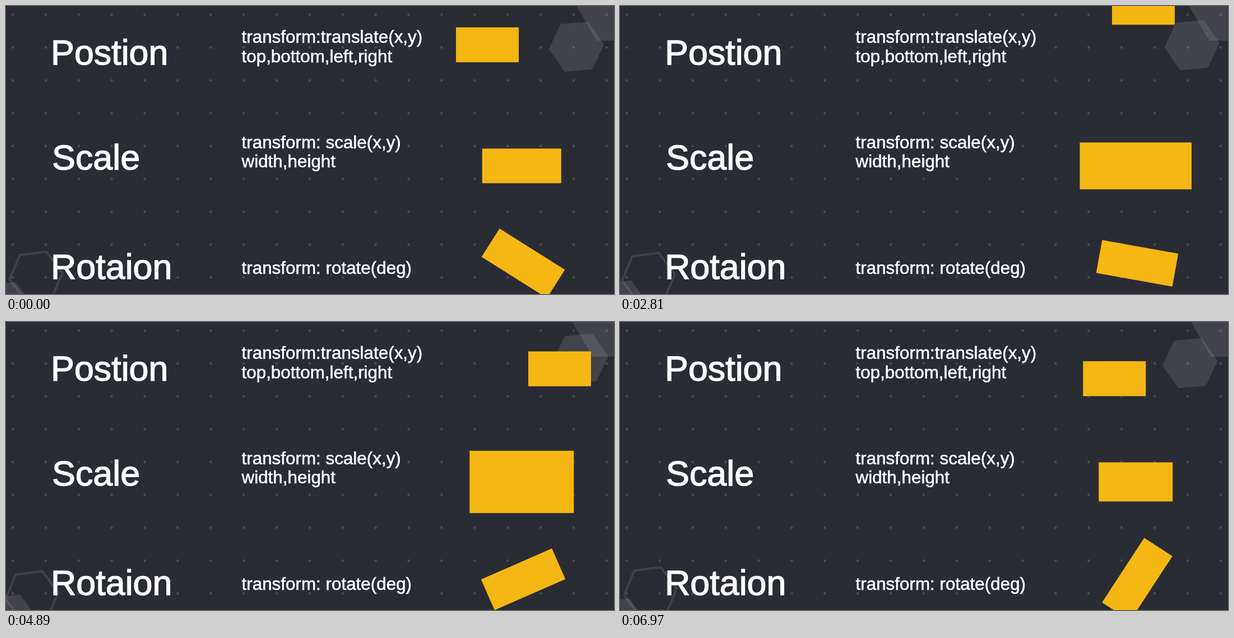
Animation of 1085x516 px, one loop 7.04 s. Source, as an HTML page:

```html
<!DOCTYPE html>
<html lang="en">
<head>
<meta charset="utf-8">
<title>Position, scale, rotation</title>
<style>
  html, body { margin: 0; width: 100%; height: 100%; overflow: hidden; background: #2a2c34; }
  svg { display: block; width: 1085px; height: 516px; }
  text {
    font-family: "Liberation Sans", Arial, sans-serif;
    fill: #fff; stroke: #fff; white-space: pre;
  }
  .title { font-size: 62.8px; stroke-width: 1.4px; }
  .code { font-size: 31.4px; stroke-width: .6px; }
  .box { fill: #f4b714; }
  .hex { fill: #fff; fill-opacity: .105; }
  .ring { fill: none; stroke: #fff; stroke-opacity: .1; stroke-width: 4; }
</style>
</head>
<body>
<svg id="stage" viewBox="0 0 1085 516"></svg>
<script>
const LOOP = 7040, HOLD = 590, STEP = 69.35;
const CYCLE = 112; // steps after which the smooth paths close

const stage = document.getElementById('stage');

function add(tag, attrs, content = '') {
  const el = document.createElementNS('http://www.w3.org/2000/svg', tag);
  set(el, attrs);
  el.textContent = content;
  return stage.appendChild(el);
}

function set(el, attrs) {
  for (const key in attrs) el.setAttribute(key, attrs[key]);
}

function hexagon(cls, cx, cy, r, tilt) {
  const points = Array.from({ length: 6 }, (_, i) => {
    const a = (tilt + i * 60) * Math.PI / 180;
    return [cx + r * Math.cos(a), cy + r * Math.sin(a)].map(v => v.toFixed(2)).join();
  });
  return add('polygon', { class: cls, points: points.join(' ') });
}

// Straight interpolation through [step, value] keys
function linear(keys, n) {
  let i = 0;
  while (i < keys.length - 2 && n > keys[i + 1][0]) i++;
  const [n0, v0] = keys[i], [n1, v1] = keys[i + 1];
  return v0 + (v1 - v0) * (n - n0) / (n1 - n0);
}

// Closed smooth curve through [step, value] keys
function smooth(keys, n) {
  const count = keys.length;
  const at = i => {
    const turn = Math.floor(i / count), [k, v] = keys[i - turn * count];
    return [k + turn * CYCLE, v];
  };
  const slope = i => (at(i + 1)[1] - at(i)[1]) / (at(i + 1)[0] - at(i)[0]);
  const tangent = i => {
    const before = at(i)[0] - at(i - 1)[0], after = at(i + 1)[0] - at(i)[0];
    return (slope(i - 1) * after + slope(i) * before) / (before + after);
  };
  let i = 0;
  while (n >= at(i + 1)[0]) i++;
  const [n0, v0] = at(i), [n1, v1] = at(i + 1);
  const h = n1 - n0, u = (n - n0) / h, w = 1 - u;
  return v0 * w * w * (1 + 2 * u) + v1 * u * u * (3 - 2 * u)
    + h * u * w * (w * tangent(i) - u * tangent(i + 1));
}

const marks = [0, 11, 33, 50, 63, 72, 93];
const track = values => values.map((v, i) => [marks[i], v]);

const moveX = track([803, 798.3, 878, 935, 932, 907, 826.3]);
const moveY = track([38.3, 4.3, -29, 9, 52.7, 71, 70.3]);
const turn = track([32.3, 85, 190.2, 275, 336.3, 381, 483]);
const drift = track([0, -4, 2.7, 9.2, 7.4, 5.4, -.8]);
const width = [[0, 141], [11, 173.5], [19.5, 199.5], [55.5, 199.5], [93, 132]];
const height = [[0, 62], [20, 62], [55.5, 122], [93, 70]];

for (let row = 0; row < 9; row++)
  for (let col = 0; col < 19; col++)
    add('circle', { cx: 12 + col * 58.88, cy: 15.5 + row * 58.85, r: 2.3, fill: '#484b53' });

const floaters = [
  [hexagon('hex', 1018, 73, 49.5, -5), 1, -1],
  [hexagon('hex', 1089, 1.4, 70, 0), -1, 0],
  [hexagon('ring', 53.5, 484, 47.5, -7), -1, .87],
  [hexagon('hex', -2, 539.5, 49, -7), 1, -.85]
];

[['Postion', 80, 105], ['Scale', 82, 293], ['Rotaion', 80, 488.5]]
  .forEach(([label, x, y]) => add('text', { class: 'title', x, y }, label));

[
  ['transform:translate(x,y)', 65.5],
  ['top,bottom,left,right', 101],
  ['transform: scale(x,y)', 254.5],
  ['width,height', 289],
  ['transform: rotate(deg)', 479.5]
].forEach(([label, y]) => add('text', { class: 'code', x: 420.5, y }, label));

const mover = add('rect', { class: 'box', width: 112, height: 62.5 });
const scaler = add('rect', { class: 'box' });
const spinner = add('rect', { class: 'box', x: -69, y: -30, width: 138, height: 60 });

function draw(time) {
  const n = time < HOLD ? 0 : 1 + Math.floor((time - HOLD + 6) / STEP);
  set(mover, { x: smooth(moveX, n), y: smooth(moveY, n) });

  const w = linear(width, n), h = linear(height, n);
  set(scaler, { x: 920.3 - w / 2, y: 286.5 - h / 2, width: w, height: h });

  set(spinner, { transform: `translate(923 461) rotate(${linear(turn, n)})` });

  const d = smooth(drift, n);
  for (const [el, dx, dy] of floaters) set(el, { transform: `translate(${d * dx} ${d * dy})` });
}

const start = performance.now();
function tick() {
  draw((performance.now() - start) % LOOP);
  requestAnimationFrame(tick);
}
tick();
</script>
</body>
</html>
```
